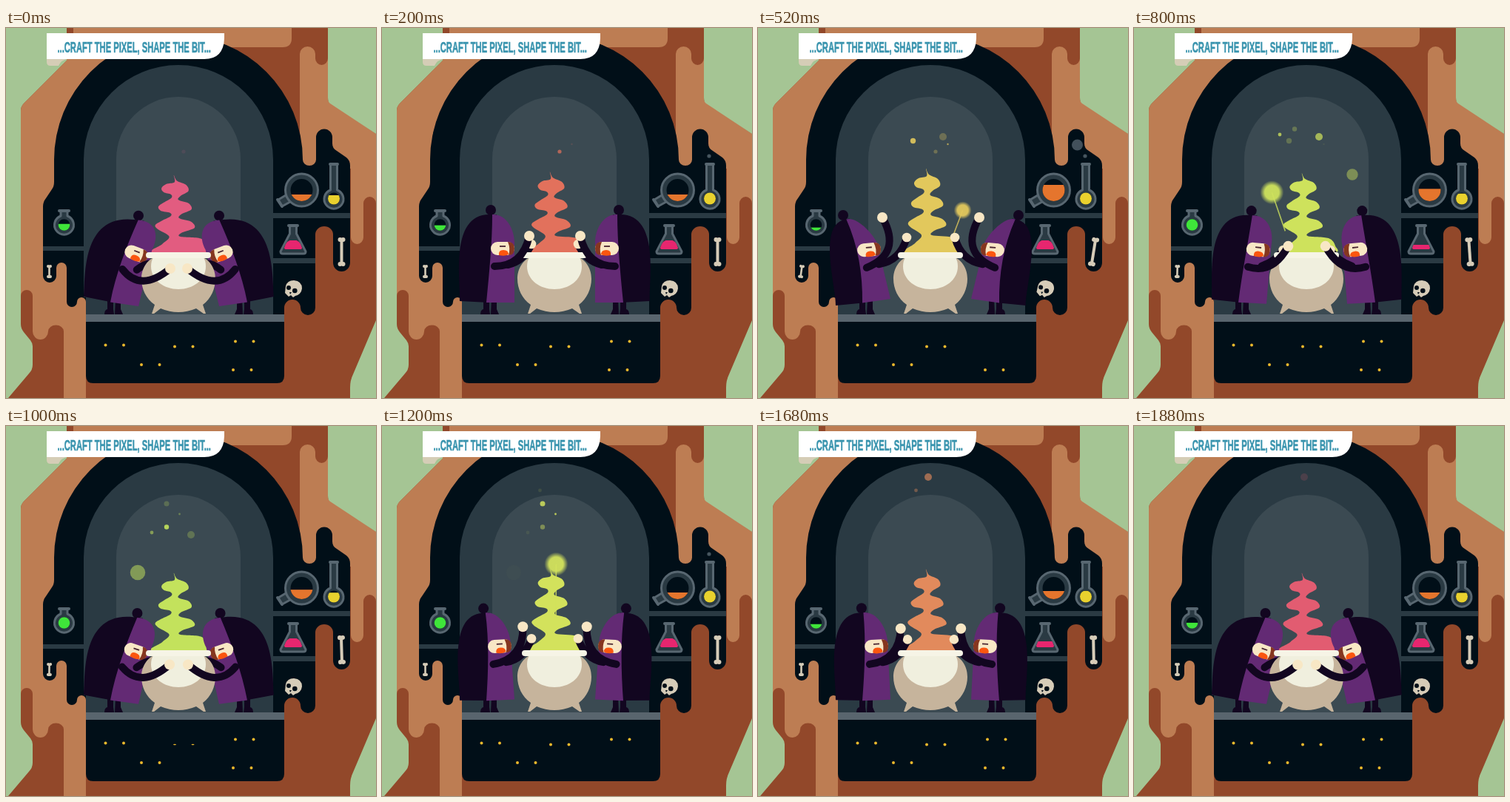
An HTML page that plays this animation: 500 px wide and 500 px high, repeating every 1.92 s.

```html
<!DOCTYPE html>
<html lang="en">
<head>
<meta charset="utf-8">
<title>Alchemists</title>
<style>
  html, body { margin: 0; width: 100%; height: 100%; overflow: hidden; background: #92482a; }
  svg { display: block; width: 100%; height: 100%; }
  .green { fill: #a5c594; }
  .clay { fill: #bd7d53; }
  .rust { fill: #92482a; }
  .night { fill: #010f18; }
  .stone { fill: #2a3a43; }
  .cloak { fill: #120620; }
  .robe { fill: #632a74; }
  .skin { fill: #f8e7c5; }
  .bone { fill: #d6ccb8; stroke: #d6ccb8; }
  .arm { fill: none; stroke: #120620; stroke-width: 10; stroke-linecap: round; }
  .glass { fill: #2a3a43; stroke: #586771; stroke-width: 3; stroke-linejoin: round; }
  .rim { stroke: #586771; stroke-width: 4; stroke-linecap: round; }
  text { font: bold 20px "Liberation Sans", Arial, sans-serif; fill: #3994ae; stroke: #3994ae; stroke-width: .6; text-anchor: middle; }
</style>
</head>
<body>
<svg viewBox="0 0 500 500">
  <defs>
    <radialGradient id="glow">
      <stop offset=".6" stop-color="currentColor"/>
      <stop offset="1" stop-color="currentColor" stop-opacity="0"/>
    </radialGradient>
    <clipPath id="greenClip"><circle cx="78.500" cy="266" r="7.800"/></clipPath>
    <clipPath id="orangeClip"><circle cx="399.500" cy="219" r="15"/></clipPath>
    <clipPath id="yellowClip"><circle cx="443" cy="230.500" r="8"/></clipPath>
    <clipPath id="pinkClip"><path d="M376 297Q379 286 388 286T400 297Q400 299 397 299H379Q376 299 376 297Z"/></clipPath>

    <g id="body">
      <path class="cloak" d="M137 366H145V380L146 387H133Q133 381 137 380ZM148 366H155V380L158 387H147Z"/>
      <circle id="bobble" class="cloak" r="7"/>
      <path id="cape" class="cloak"/>
      <path id="robe" class="robe"/>
      <g id="face">
        <rect class="skin" x="-16" y="-9" width="32" height="18" rx="9"/>
        <path fill="#86361f" d="M7-9Q16-9 16 0T8 9Q11 0 7-9Z"/>
        <path fill="#fb560f" d="M-5 9Q-6 2 1 2T8 8Q3 11-5 9Z"/>
        <path fill="none" stroke="#4a2430" stroke-width="1.800" d="M-4-3H4"/>
      </g>
      <path id="backArm" class="arm"/>
      <circle id="backHand" class="skin" r="6.300"/>
    </g>
    <g id="reach">
      <path id="frontArm" class="arm"/>
      <circle id="frontHand" class="skin" r="7"/>
    </g>
  </defs>

  <!-- cave -->
  <rect class="rust" width="500" height="500"/>
  <path class="green" d="M0 0H82V44L24 102Q20 106 20 112V400Q20 406 24 411L33 422Q36 426 36 430V455Q36 462 31 467L3 500H0Z"/>
  <path class="clay" d="M82 40V44L24 102Q20 106 20 112V362a8 8 0 0 1 16 0V410a10.500 11 0 0 0 21 0a10.500 8.500 0 0 1 21 0V500H108V365H200V40Z"/>
  <path class="clay" d="M91 0H386V14Q386 26 374 26H91Z"/>
  <path class="clay" d="M397 190V35a10.500 10 0 0 1 21 0V41a8.500 9 0 0 0 17 0V98L500 143V237a8.500 9 0 0 0-17 0V283a8.500 9 0 0 1-17 0V190Z"/>
  <path class="green" d="M435 0H500V143L438 102Q435 100 435 94ZM500 395L469 468Q465 476 465 486V500H500Z"/>
  <path class="night" d="M65 178A168 168 0 0 1 401 178a9 8 0 0 0 18 0V148a11 11.500 0 0 1 22 0V156Q441 163 447 166L460 175Q465 179 465 186V317a11.500 12 0 0 1-23 0V279a12 11 0 0 0-24 0V378a10 10 0 0 1-20 0a11 11 0 0 0-22 0V470Q376 480 366 480H118Q108 480 108 470V370a6 6 0 0 0-12 0a7 7 0 0 1-14 0V324a7 7 0 0 0-14 0V335a9 9 0 0 1-18 0V241Q50 235 54 230L62 218Q65 214 65 208Z"/>
  <path class="stone" d="M108 387V364H105V178A128 128 0 0 1 361 178V387ZM50 295H106V301H50ZM360 250H465V257H360ZM360 311H418V318H360Z"/>
  <path fill="#3b4a52" d="M149 387V177A84 84 0 0 1 317 177V387Z"/>
  <path fill="#59656e" d="M108 387H376V397H108Z"/>

  <!-- shelves -->
  <path class="glass" d="M74 247V254A13 13 0 1 0 83 254V247Z"/>
  <path class="rim" d="M72 247H85"/>
  <path class="glass" d="M378 226L368 232L373 241L384 235Z"/>
  <path class="rim" d="M367 232L373 241"/>
  <circle class="glass" cx="399.500" cy="219" r="22"/>
  <path class="glass" d="M438.500 184V219A13 13 0 1 0 447.500 219V184Z"/>
  <path class="rim" d="M438 184H448"/>
  <path class="glass" d="M383.500 267V278L371 302Q371 305 374 305H402Q405 305 405 302L392.500 278V267Z"/>
  <path class="rim" d="M382 267H394"/>
  <g clip-path="url(#greenClip)"><path class="night" d="M0 0H500V500H0Z"/><rect id="green" width="500" height="50" fill="#3fe53a"/></g>
  <g clip-path="url(#orangeClip)"><path class="night" d="M0 0H500V500H0Z"/><rect id="orange" width="500" height="50" fill="#e5752d"/></g>
  <g clip-path="url(#yellowClip)"><path class="night" d="M0 0H500V500H0Z"/><rect id="yellow" width="500" height="50" fill="#e9d12e"/></g>
  <g clip-path="url(#pinkClip)"><rect id="pink" width="500" height="50" fill="#e7266f"/></g>
  <circle id="puffSmall" cx="442" cy="173" r="2.600" fill="#586771"/>
  <circle id="puffBig" cx="431.500" cy="158" r="7.500" fill="#586771"/>
  <g id="boneLeft" class="bone"><path stroke-width="2.600" d="M58.500 323V335"/><path stroke-width="4" stroke-linecap="round" d="M57 322h0M60 322h0M57 336h0M60 336h0"/></g>
  <g id="boneRight" class="bone"><path stroke-width="4" d="M453.500 287V318"/><path stroke-width="6" stroke-linecap="round" d="M451.500 286h0M455.500 286h0M451.500 319h0M455.500 319h0"/></g>
  <g id="skull">
    <path fill="#d6ccb8" d="M378 349Q380 341 389 341Q400 342 400 352Q399 360 391 362L388 364L385 361L382 363L377 358Z"/>
    <path class="night" d="M379 351a3 3 0 1 0 6 0a3 3 0 1 0-6 0M387 355a3.300 3.300 0 1 0 6.600 0a3.300 3.300 0 1 0-6.600 0M383 357l3 0l-2 3Z"/>
  </g>

  <!-- brew -->
  <path id="smoke" fill="currentColor"/>
  <g id="bubbles" fill="currentColor"></g>
  <use href="#body"/>
  <use href="#body" transform="matrix(-1 0 0 1 467 0)"/>
  <path fill="#c6b49c" d="M201 309H265C279 316 283 329 283 339C283 352 277 366 266 374L270 386H267L257 379Q233 389 209 379L200 386H197L201 374C189 366 183 352 183 339C183 329 187 316 201 309Z"/>
  <path fill="#f0efde" d="M200 309H266Q270 314 270 322C270 341 252 353 233 353S196 341 196 322Q196 314 200 309Z"/>
  <rect x="189" y="303" width="88" height="8" rx="4" fill="#f6f4e6"/>
  <use href="#reach"/>
  <use href="#reach" transform="matrix(-1 0 0 1 467 0)"/>
  <g id="eyes" fill="#edb92c"></g>

  <!-- banner -->
  <path fill="#d5cdb6" d="M55 41H86Q74 43 71 51H60Q55 51 55 46Z"/>
  <path fill="#fff" d="M55 7H295V14Q294 42 268 42H55Z"/>
  <text transform="translate(173.200 33) scale(.56 1)">...CRAFT THE PIXEL, SHAPE THE BIT...</text>
</svg>
<script>
const LOOP = 1920, BEAT = 960, STEP = 40;
const $ = id => document.getElementById(id);
const clamp = v => Math.max(0, Math.min(1, v));
const ease = v => (1 - Math.cos(Math.PI * clamp(v))) / 2;
// Rises from 0 at start to 1 at peak, back to 0 at end
const hump = (t, start, peak, end) =>
  clamp(t < peak ? (t - start) / (peak - start) : (end - t) / (end - peak));

function set(node, attrs) {
  for (const name in attrs) node.setAttribute(name, attrs[name]);
}
function add(parent, tag, attrs = {}) {
  const node = document.createElementNS('http://www.w3.org/2000/svg', tag);
  set(node, attrs);
  return parent.appendChild(node);
}

// Bends an upright point about the feet; lean is 1 over the pot, -1 away from it
function bend(x, y, lean) {
  const h = (371 - y) / 119;
  return [
    x + 29 * lean * h * h * (x - 60) / 87,
    y + 7 * lean * lean * h + .15 * lean * (x - 145)
  ];
}
const bendPath = (d, lean) =>
  d.replace(/([\d.]+) ([\d.]+)/g, (_, x, y) => bend(+x, +y, lean).map(v => v.toFixed(2)).join(' '));

// Quadratic through three key points: leaning in, upright, leaning out
const through = (keys, lean) => [0, 1].map(c => {
  const [a, m, b] = keys.map(p => p[c]);
  return m + (a - b) / 2 * lean + ((a + b) / 2 - m) * lean * lean;
});

const cape = 'M105 369C107 345 90 252 145 252L155 252L155 300L144 371Z';
const robe = 'M141 371C145 330 149 290 149 252C168 251 179 272 179 290L179 371Z';
const elbow = [[182, 358], [190, 322], [195, 304]];
const frontHand = [[222, 325], [199, 281], [168, 256]];
const backHand = [[200, 320], [202, 292], [201, 283]];

function drawWizard(lean) {
  const place = (id, [cx, cy]) => set($(id), { cx, cy });
  const front = through(frontHand, lean), back = through(backHand, lean);
  place('bobble', bend(147, 246, lean));
  place('frontHand', front);
  place('backHand', back);
  set($('cape'), { d: bendPath(cape, lean) });
  set($('robe'), { d: bendPath(robe, lean) });
  set($('face'), {
    transform: `translate(${bend(163, 298, lean)}) rotate(${13 * lean + 8 * lean * lean})`
  });
  set($('frontArm'), { d: `M${bend(152, 322, lean)}Q${through(elbow, lean)} ${front}` });
  set($('backArm'), { d: `M${bend(170, 320, lean)}Q192,315 ${back}` });
}

// Closed Catmull-Rom curve
function smoothPath(pts) {
  const n = pts.length, p = i => pts[(i + n) % n];
  const handle = (i, k) => [0, 1].map(c => p(i)[c] + k * (p(i + 1)[c] - p(i - 1)[c]) / 6);
  return 'M' + p(0) + pts.map((_, i) =>
    'C' + [handle(i, 1), handle(i + 1, -1), p(i + 1)].join(' ')).join('') + 'Z';
}

// Tiers widen downwards: lobes and slots on the right, fingers and slots on the left
function smokeOutline() {
  const right = [], left = [];
  for (let k = 0; k < 3; k++) {
    const y = 208 + 27 * k;
    right.push([243 + 3 * k, y - 4], [246 + 4 * k, y + 5], [236 + k, y + 12], [233 + k, y + 18]);
    left.unshift([214 - 4 * k, y + 7], [211 - 4 * k, y + 1], [217 - 3 * k, y - 5], [225 - k, y - 12], [224 - k, y - 17]);
  }
  left.splice(-2);
  return [[227, 190], [231, 198], ...right, [262, 283], [271, 294], [268, 304],
    [199, 304], [212, 291], [221, 280], ...left, [228, 200]];
}
const smoke = smokeOutline();

// x, y, radius, time of full strength
const bubbles = [
  [240, 167, 2.6, 260], [256.5, 157, 1.2, 440], [209.5, 152.5, 3.7, 520],
  [250, 147, 5, 720], [197, 144, 2.4, 840], [217, 136.5, 3.2, 1000],
  [234.5, 119, 1.4, 1180], [217, 105, 3.5, 1220], [213.5, 87, 2.4, 1460], [230, 69, 5, 1560]
].map(([cx, cy, r, peak]) => ({ peak, node: add($('bubbles'), 'circle', { cx, cy, r }) }));

// Flying drops that end as a fading bubble
const FLIGHT = 180;
const shots = [
  { from: [262, 285], to: [295, 198], r: 12, start: 440 },
  { from: [208, 285], to: [178, 198], r: 16, start: 670 },
  { from: [235, 270], to: [235.5, 149], r: 16, start: 1076 }
].map(shot => ({
  ...shot,
  tail: add($('bubbles'), 'path', { stroke: 'currentColor', 'stroke-width': 1.6 }),
  ball: add($('bubbles'), 'circle')
}));

function drawShot({ from, to, r, start, tail, ball }, t) {
  const k = (t - start) / FLIGHT, flying = k > 0 && k < 1;
  const point = f => from.map((v, c) => v + (to[c] - v) * clamp(f));
  const [cx, cy] = point(k);
  set(ball, {
    cx, cy, r: flying ? r : r * .64,
    fill: flying ? 'url(#glow)' : 'currentColor',
    opacity: flying ? .95 : k < 1 ? 0 : .9 * clamp(1 - (k - 1) / 2)
  });
  set(tail, { d: `M${point(k - .6)}L${cx},${cy}`, opacity: flying ? .8 : 0 });
}

// x, y, time of the blink
const eyes = [
  [134.5, 428.5, 1520], [228, 430.5, 960], [183, 455, 680], [310, 423.5, 520], [307, 462, 1200]
].map(([x, cy, blink]) => ({
  blink, pair: [x, x + 24.5].map(cx => add($('eyes'), 'ellipse', { cx, cy, rx: 2 }))
}));

function draw(t) {
  const beat = t % BEAT;
  const out = beat < 540 ? ease(beat / 400) : 1 - ease((beat - 540) / 420);
  drawWizard(1 - 2 * out);

  const tall = .92 + .08 * out, wide = 1.04 - .04 * out;
  set($('smoke'), { d: smoothPath(smoke.map(([x, y]) =>
    [233 + (x - 233) * wide, 303 + (y - 303) * tall])) });

  const hue = 434 - 90 * Math.min(1, Math.abs(t - 980) / 940) ** 1.75;
  document.querySelector('svg').style.color = `hsl(${hue % 360}, 70%, 62.5%)`;

  for (const { node, peak } of bubbles)
    set(node, { opacity: .9 * hump(t, peak - 300, peak, peak + 400) });
  for (const shot of shots) drawShot(shot, t);

  const dip = hump(Math.abs(t - 1000), 220, 440, 1400);
  const full = Math.abs(t - 1000) < 300 && dip < .5;
  set($('green'), { y: full ? 258 : 261 + 9 * dip });
  set($('orange'), { y: 225 - 13 * hump(t, 240, 520, 1200) - 4 * hump(t, 1200, 1480, 1880) });
  set($('yellow'), { y: 226 - 4 * Math.min(1, 2 * hump(beat, 0, 400, 960)) });
  set($('pink'), { y: 287 + 6 * hump(beat, 560, 800, 920) });
  set($('puffSmall'), { opacity: Math.min(.8, 3 * hump(beat, 120, 380, 680)) });
  set($('puffBig'), { opacity: .75 * hump(beat, 340, 520, 720) });

  const lean = hump(t, 240, 520, 700);
  const rock = hump(t, 600, 800, 1160) + hump(t, 1200, 1480, 1760);
  set($('boneLeft'), { transform: `rotate(${8 * lean + 2 * rock} 58.5 329)` });
  set($('boneRight'), { transform: `rotate(${9 * lean - 4 * rock} 453.5 302.5)` });
  set($('skull'), { transform: `rotate(${6 * lean} 388 352)` });

  for (const { blink, pair } of eyes) {
    const ry = 2 * clamp((Math.abs(t - blink) - 20) / 50);
    for (const eye of pair) set(eye, { ry });
  }
}

const origin = performance.now();
function tick() {
  const elapsed = Math.max(0, performance.now() - origin) % LOOP;
  draw(Math.floor(elapsed / STEP) * STEP);
  requestAnimationFrame(tick);
}
tick();
</script>
</body>
</html>
```
